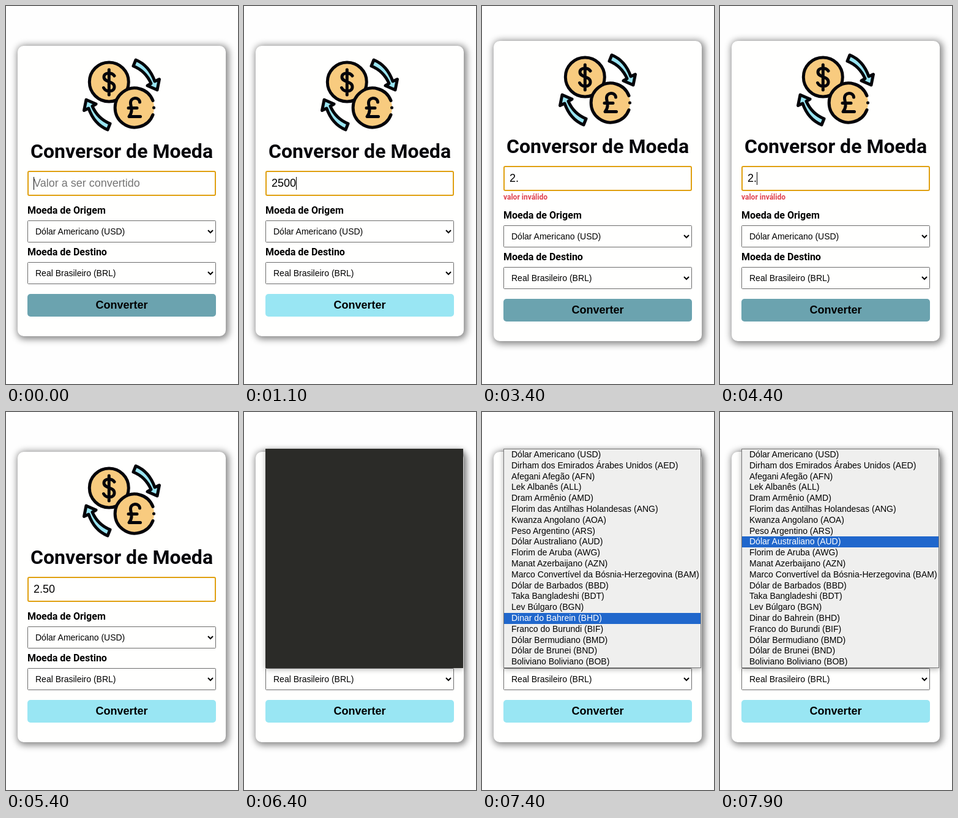
An HTML page for the animation above (8 s loop, 379x617 px).

```html
<!DOCTYPE html>
<html lang="pt-BR">
<head>
<meta charset="utf-8">
<title>Conversor de Moeda</title>
<style>
html, body { margin: 0; width: 100%; height: 100%; overflow: hidden; background: #fefefe; }
#card { position: absolute; left: 19px; width: 340px; border-radius: 10px; background: #fffffe;
  box-shadow: 2px 2px 11px 3px rgba(0, 0, 0, .46); }
svg { position: absolute; left: 0; top: 0; }
text { font: 14px "Liberation Sans", Arial, sans-serif; fill: #000; }
text.big { font-size: 18px; }
text.bold { font-weight: 700; }
text.label { font: 700 16px Roboto, sans-serif; }
text.title { font: 700 32px Roboto, sans-serif; fill: #05050a; }
#error { font: 700 12px Roboto, sans-serif; fill: #e0414f; }
.box { fill: #fffffe; stroke: #6b6b6b; }
.icon { fill: none; stroke: #05050a; stroke-width: 5; stroke-linecap: round; stroke-linejoin: round; }
.coin { fill: #f8cb7f; }
.arrow { fill: #99e5f3; }
#popup { filter: drop-shadow(0 2px 4px rgba(0, 0, 0, .3)); }
</style>
</head>
<body>
<div id="card"></div>
<svg width="379" height="617" viewBox="0 0 379 617">
  <defs>
    <path id="curve" class="arrow" d="M212 88Q234 97 243 123L250.5 119.500 247 137 231 130 237 126.500Q228 106 208 98Z"/>
    <path id="chevron" d="M330 -2l4 4 4-4" fill="none" stroke="#000" stroke-width="2"/>
  </defs>
  <g id="upper">
    <g class="icon">
      <use href="#curve"/>
      <use href="#curve" transform="rotate(180 189 145)"/>
      <circle class="coin" cx="168.300" cy="124" r="32"/>
      <path d="M168.300 104V145M177 114C173 108 160 108 160 116C160 125 177 122 177 132C177 141 163 141 159.500 133.500"/>
      <circle class="coin" cx="210" cy="166" r="32" stroke="none"/>
      <path d="M240 154.500A32 32 0 1 0 240 177.500"/>
      <path d="M218.500 157C218 148 203 148 203.500 159C204 165 208 172 201 180.500H219.500M200 166.500H214"/>
      <circle cx="241.500" cy="166" r="2.500" fill="#05050a" stroke="none"/>
    </g>
    <text class="title" x="189" y="248" text-anchor="middle">Conversor de Moeda</text>
    <rect x="36" y="270" width="306" height="39" rx="2" fill="#fffffe" stroke="#e0a010" stroke-width="2"/>
    <text id="value" class="big" x="45" y="295"></text>
    <rect id="caret" y="279" width="1" height="21"/>
  </g>
  <text id="error" x="35" y="316">valor inválido</text>
  <g id="lower">
    <text class="label" x="35" y="339">Moeda de Origem</text>
    <rect class="box" x="35.500" y="350.500" width="307" height="35" rx="1"/>
    <text x="48" y="373">Dólar Americano (USD)</text>
    <use href="#chevron" y="368"/>
    <text class="label" x="35" y="407">Moeda de Destino</text>
    <rect class="box" x="35.500" y="418.500" width="307" height="35" rx="1"/>
    <text x="48" y="441">Real Brasileiro (BRL)</text>
    <use href="#chevron" y="436"/>
    <rect id="button" x="35" y="470" width="308" height="37" rx="5"/>
    <text class="big bold" x="189" y="494" text-anchor="middle">Converter</text>
  </g>
  <g id="popup">
    <rect id="panel" x="35.500" y="60.500" width="322" height="357"/>
    <g id="list"><rect id="mark" x="36" width="321" height="18" fill="#2067cc"/></g>
  </g>
</svg>
<script>
const $ = id => document.getElementById(id);
const LOOP = 8000, ROWS = 20, PITCH = 17.8;

const currencies = [
  "Dólar Americano (USD)", "Dirham dos Emirados Árabes Unidos (AED)", "Afegani Afegão (AFN)",
  "Lek Albanês (ALL)", "Dram Armênio (AMD)", "Florim das Antilhas Holandesas (ANG)",
  "Kwanza Angolano (AOA)", "Peso Argentino (ARS)", "Dólar Australiano (AUD)",
  "Florim de Aruba (AWG)", "Manat Azerbaijano (AZN)",
  "Marco Convertível da Bósnia-Herzegovina (BAM)", "Dólar de Barbados (BBD)",
  "Taka Bangladeshi (BDT)", "Lev Búlgaro (BGN)", "Dinar do Bahrein (BHD)",
  "Franco do Burundi (BIF)", "Dólar Bermudiano (BMD)", "Dólar de Brunei (BND)",
  "Boliviano Boliviano (BOB)", "Real Brasileiro (BRL)", "Dólar das Bahamas (BSD)"
];

// [time, typed text, caret visible]
const typing = [
  [0, "", 1], [500, "2", 1], [900, "25", 1], [1000, "250", 1], [1100, "2500", 1],
  [1600, "", 1], [2000, "2", 1], [2300, "2.", 0], [2800, "2.", 1], [3400, "2.", 0],
  [3900, "2.5", 1], [4400, "2.", 1], [4600, "2.5", 1], [4700, "2.50", 1],
  [5400, "2.50", 0], [6000, "2.50", 1]
];

// [time, first visible item, highlighted row]
const browsing = [
  [6500, 1, 19], [6900, 2, 19], [7000, 2, 18], [7100, 1, 17], [7300, 1, 16], [7400, 0, 15],
  [7500, 0, 14], [7600, 0, 13], [7700, 0, 12], [7800, 0, 10], [7900, 0, 8]
];

const rows = Array.from({ length: ROWS }, (_, i) => {
  const row = document.createElementNS("http://www.w3.org/2000/svg", "text");
  row.setAttribute("x", 48);
  row.setAttribute("y", Math.round(61 + i * PITCH) + 13);
  return $("list").appendChild(row);
});

const at = (steps, t) => steps.findLast(step => step[0] <= t);
const set = (id, name, value) => $(id).setAttribute(name, value);
const show = (id, on) => set(id, "visibility", on ? "visible" : "hidden");

function drawForm(t) {
  const [, text, caret] = at(typing, t);
  const invalid = text.endsWith(".");
  const shift = invalid ? 8 : 0;
  $("card").style.top = 65 - shift + "px";
  $("card").style.height = 474 + 2 * shift + "px";
  set("upper", "transform", `translate(0 ${-shift})`);
  set("lower", "transform", `translate(0 ${shift})`);
  show("error", invalid);
  $("value").textContent = text || "Valor a ser convertido";
  $("value").style.fill = text ? "#000" : "#757575";
  const width = [...text].reduce((sum, c) => sum + (c === "." ? 5 : 10), 0);
  set("caret", "x", 45 + width);
  show("caret", caret);
  set("button", "fill", text && !invalid ? "#99e6f3" : "#6ba3af");
}

function drawPopup(t) {
  $("popup").style.display = t < 6400 ? "none" : "";
  const state = at(browsing, t);
  $("list").style.display = state ? "" : "none";
  set("panel", "fill", state ? "#efefee" : "#2b2b28");
  set("panel", "stroke", state ? "#767676" : "#2b2b28");
  if (!state) return;
  const [, first, active] = state;
  set("mark", "y", Math.round(61 + active * PITCH));
  rows.forEach((row, i) => {
    row.textContent = currencies[first + i];
    row.style.fill = i === active ? "#fff" : "#000";
  });
}

const start = performance.now();
function draw() {
  const t = (performance.now() - start) % LOOP;
  drawForm(t);
  drawPopup(t);
  requestAnimationFrame(draw);
}
draw();
</script>
</body>
</html>
```
